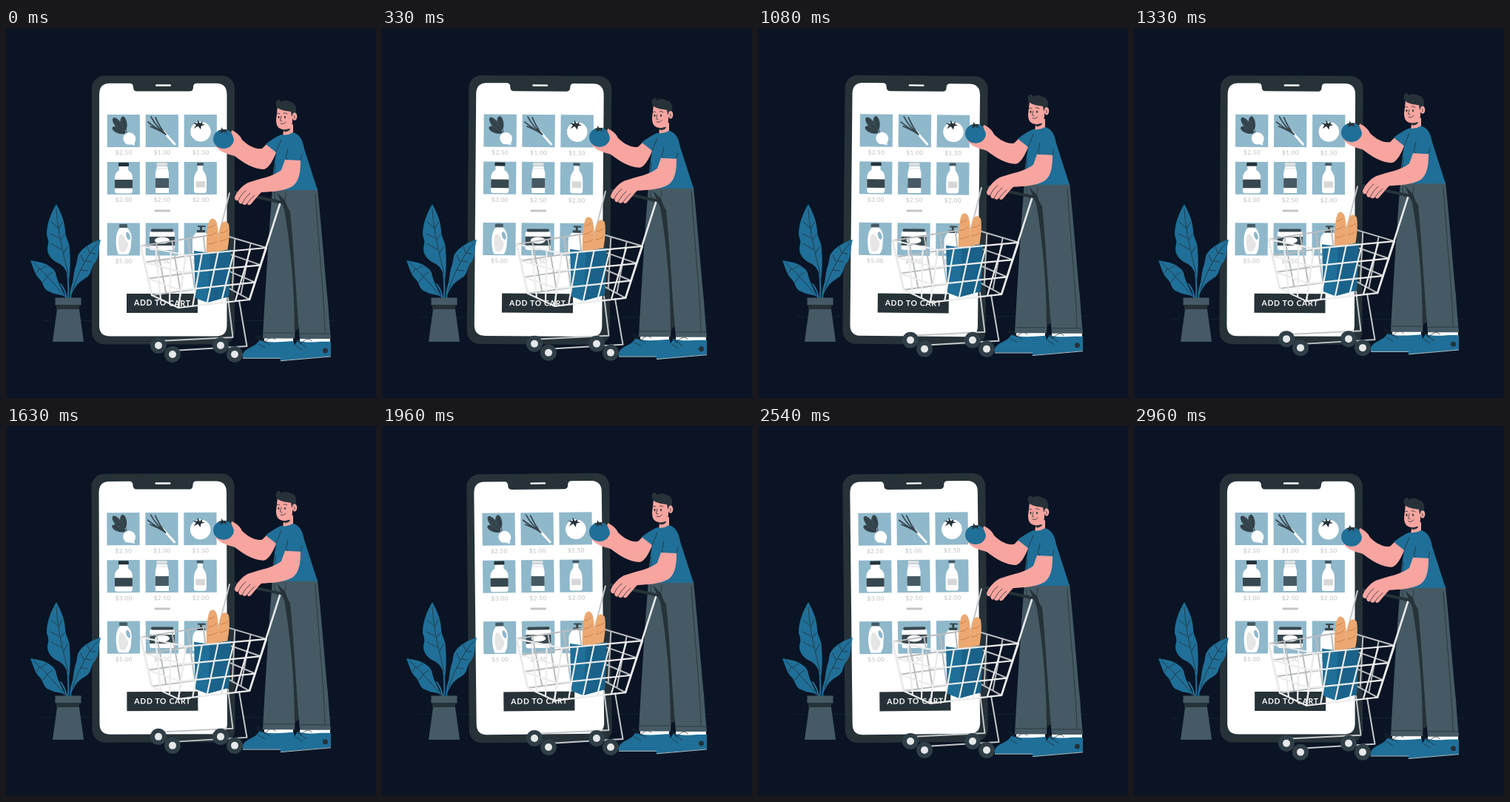
Recreate the animation shown at these times as an HTML page. Size 500 by 500 pixels, loop 3 s.

```html
<!DOCTYPE html>
<html lang="en">
<head>
<meta charset="utf-8">
<title>Online grocery shopping</title>
<style>
  html, body { margin: 0; width: 100%; height: 100%; overflow: hidden; background: #0a1424; }
  svg { display: block; width: 100%; height: 100%; }
  .blue { fill: #1f6f98; }
  .ink { fill: #263238; }
  .coal { fill: #37474f; }
  .slate { fill: #455a64; }
  .skin { fill: #f8a5a0; }
  .white { fill: #fff; }
  .tile { fill: #8fb8cb; }
  .line { fill: none; stroke: #263238; stroke-width: .8; stroke-linecap: round; stroke-linejoin: round; }
  .rail { fill: none; stroke-linecap: round; stroke-linejoin: round; }
  .price { font: 8px Lato, sans-serif; letter-spacing: .5px; fill: #bdbdbd; text-anchor: middle; }
  .button { font: bold 10.4px Lato, sans-serif; letter-spacing: .7px; fill: #fff; text-anchor: middle; }
</style>
</head>
<body>
<svg viewBox="0 0 500 500" xmlns="http://www.w3.org/2000/svg">
  <path id="floor" d="M50 395.5H61M65 395.5H415M419 395.5H447" stroke="#1a2632" stroke-width=".8"/>

  <g id="phone">
    <rect class="ink" x="116" y="64.5" width="193" height="363" rx="17"/>
    <path class="white" d="M140 74.700H167Q172 74.700 172 80Q172 85.500 177 85.500H248Q253 85.500 253 80Q253 74.700 258 74.700H284Q298.500 74.700 298.500 90V402Q298.500 416.500 284 416.500H140.500Q126 416.500 126 402V90Q126 74.700 140 74.700Z"/>
    <rect class="white" x="202" y="76.300" width="21" height="2.400" rx="1.200"/>
    <g id="tiles"></g>
    <rect x="200.500" y="245.500" width="21.500" height="3" rx="1" fill="#c6c6c6"/>

    <!-- beet -->
    <g class="coal">
      <ellipse cx="159" cy="129" rx="4.500" ry="9.500" transform="rotate(-8 159 129)"/>
      <ellipse cx="151" cy="129.500" rx="4.500" ry="10" transform="rotate(-38 151 129.500)"/>
      <ellipse cx="152.500" cy="138" rx="4.500" ry="9.500" transform="rotate(-70 152.500 138)"/>
    </g>
    <path class="line" d="M146 124L166 146M158 121L164 144M145 135L164 145"/>
    <path class="white" d="M163 142C170 139 177 146 175 152C174 155 173 156 174 159C170 156 163 160 160 154C157 149 159 144 163 142Z"/>
    <!-- leek -->
    <path class="rail" d="M212 139L228 157" stroke="#fff" stroke-width="3"/>
    <path class="rail" d="M216 144C208 135 206 129 202 121M216 144C207 136 202 131 196 120M216 144C206 137 199 133 192 127M216 144C208 138 202 136 195 133" stroke="#37474f" stroke-width="1.700"/>
    <!-- tomato -->
    <ellipse class="white" cx="263" cy="140" rx="13.800" ry="13.500"/>
    <path class="ink" d="M259 124L262 129L266 126L265 129.500L269 131L264 132L263 137L259.500 132.500L254 136L257 131L253 128L259 129Z"/>
    <!-- bottles -->
    <rect class="ink" x="152" y="182" width="14" height="5" rx="1"/>
    <path class="white" d="M153 187H165V192Q171 196 171 202V220Q171 223.500 168 223.500H150Q147 223.500 147 220V202Q147 196 153 192Z"/>
    <rect class="coal" x="147" y="205" width="24" height="11.500"/>
    <rect x="203.500" y="182" width="14.500" height="4.500" rx="1" fill="#dedede"/>
    <path class="white" d="M204 187H218L220 196V223H202V196Z"/>
    <path d="M204 190H218" stroke="#ddd"/>
    <rect class="slate" x="202" y="203" width="18" height="13"/>
    <rect class="slate" x="258" y="182" width="9" height="4" rx="1"/>
    <path class="white" d="M259 186H266V192Q271 198 271 205V220Q271 223 268 223H257Q254 223 254 220V205Q254 198 259 192Z"/>
    <rect x="256.500" y="207" width="12.500" height="8.500" fill="#d7d7d7"/>
    <!-- detergent -->
    <rect class="slate" x="153" y="265" width="11" height="5" rx="1"/>
    <path class="white" d="M154 270H163C168 273 171 280 169 290C169 297 168 302 165 306H152C149 301 148 290 149 282Q150 274 154 270Z"/>
    <ellipse class="tile" cx="165" cy="281" rx="2.600" ry="5.500" transform="rotate(-18 165 281)"/>
    <path d="M154 279C160 277 160 286 165 290C165 298 162 303 156 303C151 299 151 283 154 279Z" fill="#e6e6e6"/>
    <!-- jar -->
    <rect class="white" x="194" y="275" width="34" height="25" rx="3"/>
    <rect class="coal" x="196" y="271.500" width="30" height="4" rx="1.500"/>
    <rect class="coal" x="194" y="282" width="34" height="12"/>
    <ellipse class="white" cx="211" cy="287" rx="10" ry="4.500"/>
    <!-- pump bottle -->
    <path class="coal" d="M259 267H268Q270 267 270 269H265V273H269V276.500H258V273H262V269H259Z"/>
    <path class="white" d="M257 276.500H270Q275 281 275 287V304H252V287Q252 281 257 276.500Z"/>

    <rect class="ink" x="163" y="359" width="96" height="26"/>
    <text class="button" x="211.300" y="375.500">ADD TO CART</text>
  </g>

  <g id="plant">
    <path class="rail" d="M82 322Q85 340 84 366M74 346Q81 356 82 366M93 340Q87 352 87 366" stroke="#1f6f98" stroke-width="2"/>
    <path class="blue" d="M68 238C61 250 55 264 55 279C56 285 59 288 56 296C55 308 64 315 73 319C79 323 83 330 85 340C87 328 87 312 86 300C86 288 80 284 80 274C79 258 73 248 68 238Z"/>
    <path class="blue" d="M33 314C44 316 53 317 60 323C65 326 67 329 68 335C71 346 76 354 81 364C73 359 67 361 58 356C50 353 51 345 46 340C39 334 37 324 33 314Z"/>
    <path class="blue" d="M128 286C117 289 106 295 100 303C95 309 97 315 94 322C91 332 90 348 87 364C92 351 97 344 106 339C116 334 114 326 118 320C127 311 124 300 128 286Z"/>
    <path class="line" stroke-width=".6" d="M68 245C70 275 77 305 84 332M70 270L61 262M72 284L60 278M75 299L61 292M71 272L76 262M74 286L79 279M78 304L83 295M37 317C51 330 64 344 78 361M47 326L55 321M56 335L63 330M45 325L42 331M56 336L50 343M124 291C111 305 99 327 90 354M113 304L121 305M106 315L116 316M100 327L110 328M113 303L110 296M105 315L101 307"/>
    <rect class="slate" x="66.500" y="364.500" width="35" height="10"/>
    <rect class="ink" x="68" y="374.500" width="31" height="5.500"/>
    <path class="slate" d="M69 380H99L105 424H63Z"/>
  </g>

  <g id="shopper">
    <!-- shoes and socks -->
    <path class="white" d="M349 416H388V426H349ZM397 416H438V426H397Z"/>
    <path class="blue" d="M342 422C353 425 365 425 389 423L390 433L371 446H320C319 441 321 437 326 434C333 430 339 428 342 422Z"/>
    <path class="blue" d="M394 422C406 427 424 423 439 424V443.500L371 449.500C370 443 374 438 380 435C387 432 391 428 394 422Z"/>
    <path d="M320 446.300H371M371 449.800L439 443.900" stroke="#dce6ea" stroke-width=".8"/>
    <path class="line" stroke-width="1" d="M350 425C342 414 336 414 340 419C343 422 347 421 350 425C354 418 360 417 364 421M341 427L350 432M347 421L356 428M398 427C390 415 386 414 389 420C392 424 396 423 398 427C404 420 410 418 413 423M391 429L400 435M396 424L406 432"/>
    <circle class="ink" cx="431.500" cy="436" r="3.500"/>

    <!-- trousers -->
    <path class="slate" d="M360 217H400L390 419.500H347C350 360 354 300 357 255Z"/>
    <path class="ink" d="M366 222L384 240L397 405L390 410C390 350 384 290 376 245Z"/>
    <path class="slate" d="M376 217H421C426 265 431 330 435 370Q437 400 439 420H397C392 365 390 310 384 248C378 240 376 230 376 217Z"/>
    <path class="line" stroke-width=".7" d="M348 412H389M397 413H438M418 224C422 290 429 350 431 412M378 222Q378 231 375 236M363 222Q362 234 368 239"/>

    <!-- far arm with tomato -->
    <path class="skin" d="M305 138C313 142 317 146 319 151C328 160 338 164 346 163L354 155L366 166C361 179 355 190 348 191C336 191 320 182 309 173C298 170 288 167 283 159C286 157 290 160 294 160L305 154Z"/>
    <ellipse class="blue" cx="294" cy="150" rx="14" ry="13"/>
    <path class="ink" d="M291 134L293.500 137.500L299 137L296.500 140L300 143L294 140.500L289 143L290.500 139.500L286 139L291 137.500Z"/>
    <path class="skin" d="M304 140C309 138 315 145 317 150L313 157L307 158C310 150 306 146 304 140Z"/>

    <!-- head -->
    <path class="skin" d="M376 132L388 130L388 143Q382 149 374 146Z"/>
    <path class="ink" d="M373 137L384 136Q384 139 377 140.500Z"/>
    <path class="skin" d="M367 106L387 108V127C386 135 381 138 374 137C367 136 365 131 365 124Z"/>
    <path class="ink" d="M366 107C363 101 365 97 369 97Q371 97 371 100C376 97 382 98 384 100C391 101 393 107 392 113L389 121L386 119L385 113C379 112 372 112 366 107Z"/>
    <ellipse class="skin" cx="390" cy="119.500" rx="3.300" ry="5.200"/>
    <ellipse class="ink" cx="368.500" cy="120.500" rx="1" ry="1.700"/>
    <ellipse class="ink" cx="377" cy="120.500" rx="1" ry="1.700"/>
    <path class="line" d="M366 116Q368 114 370 116M375 115Q377 114 380 116M372 119L370.500 125L373 126M371 129Q375 131 378 127M389 118Q391 119 390 122"/>

    <!-- shirt -->
    <path class="blue" d="M372 144Q380 146 388 141C397 144 401 151 403 163L421 219H360C360 202 362 186 365 168L351 157C357 152 365 147 372 144Z"/>
    <path class="line" d="M365 168L372 151M379 201C382 190 379 184 381 172M364 184L362 209"/>

    <g id="cart">
      <path class="rail" d="M302 223L288 278M300 365L306.500 418L205 423M315 368L325.500 430L225 436" stroke="#c4c8ca" stroke-width="2"/>
      <g id="basketBack" class="rail" stroke="#b9bcbe" stroke-width="2"></g>

      <!-- bread and bag -->
      <path d="M271 306C270 285 272 264 276 259Q280 255 284 261C288 272 287 290 286 306Z" fill="#eba871"/>
      <path d="M285 306C286 290 288 268 292 263Q297 259 301 265C303 275 301 293 298 306Z" fill="#eba871"/>
      <path class="rail" d="M274 270Q279 269 282 266M273 281Q279 281 284 276M273 292Q280 292 285 288M290 277Q295 277 300 273M289 288Q295 288 299 284" stroke="#c98350" stroke-width="1"/>
      <path class="blue" d="M254 301L276 304L304 299L301 363L272 371L256 365Z"/>
      <path d="M276 304L304 299L301 363L272 371Z" fill="#1a6289"/>

      <g id="basketFront" class="rail" stroke="#ececec" stroke-width="2.200"></g>
      <g id="wheels"></g>
      <path class="rail" d="M301 220L374 236" stroke="#263238" stroke-width="4"/>
      <path class="rail" d="M370 238L329 367" stroke="#e8eaeb" stroke-width="2.600"/>
    </g>

    <!-- near arm -->
    <path class="skin" d="M377 178L398 179C398 192 397 207 387 214C375 221 359 221 345 222C340 227 336 232 331 238Q327 241 326 237Q322 241 319 237Q315 239 314 233Q309 234 309 229C311 222 319 213 327 209C344 203 361 201 372 192Z"/>
    <path class="line" stroke-width=".7" d="M314 233Q318 224 324 220M319 237Q324 228 330 223M326 237Q330 231 336 226"/>
    <path class="blue" d="M381 158Q393 148 400 162L398 178L378 176Z"/>
    <path class="line" d="M381 163L378 176M398 178L400 171"/>
  </g>
</svg>
<script>
  const $ = id => document.getElementById(id);

  const columns = [136.7, 188.7, 240.7];
  const shelves = [
    { y: 117, prices: ["$2.50", "$1.00", "$1.50"] },
    { y: 181, prices: ["$3.00", "$2.50", "$2.00"] },
    { y: 263.5, prices: ["$5.00", "$4.50", "$3.50"] }
  ];
  $("tiles").innerHTML = shelves.map(({ y, prices }) => columns.map((x, i) =>
    `<rect class="tile" x="${x}" y="${y}" width="44.2" height="44"/>
     <text class="price" x="${x + 22.5}" y="${y + 54.3}">${prices[i]}</text>`
  ).join("")).join("");

  const mix = (a, b, k) => a.map((v, i) => v + (b[i] - v) * k);

  // Wire panel between two upright edges, each given as [top, bottom].
  function panel(left, right, bars, rails) {
    let d = "";
    const segment = (a, b) => { d += `M${a}L${b}`; };
    for (let i = 0; i <= bars; i++)
      segment(mix(left[0], right[0], i / bars), mix(left[1], right[1], i / bars));
    for (let i = 0; i <= rails; i++)
      segment(mix(...left, i / rails), mix(...right, i / rails));
    return `<path d="${d}"/>`;
  }
  const west = [[182, 294.5], [197, 361]];
  const north = [[288, 278], [294, 348]];
  const east = [[352, 297], [329, 367]];
  const south = [[243, 307], [233, 378]];
  $("basketBack").innerHTML = panel(west, north, 5, 3) + panel(north, east, 3, 3);
  $("basketFront").innerHTML = panel(west, south, 3, 3) + panel(south, east, 5, 3);

  $("wheels").innerHTML = [[206, 429], [290, 429], [225, 441], [309, 441]].map(([x, y]) =>
    `<circle cx="${x}" cy="${y}" r="11" fill="#303f47"/><circle cx="${x}" cy="${y}" r="5" fill="#e6e8e9"/>`
  ).join("");

  // Linear 0 -> 1 -> 0 over one period.
  const rise = (t, period) => 1 - Math.abs(1 - 2 * ((t / period) % 1));

  function draw(t) {
    const sway = 2 * rise(t + 750, 3000) - 1;
    $("phone").setAttribute("transform", `rotate(${sway} 212.5 246)`);
    $("shopper").setAttribute("transform", `translate(0 ${-10 * rise(t, 3000)})`);
    $("floor").setAttribute("transform", `translate(0 ${-10 * rise(t, 1500)})`);
  }

  const start = performance.now();
  function tick() {
    draw((performance.now() - start) % 3000);
    requestAnimationFrame(tick);
  }
  tick();
</script>
</body>
</html>
```
